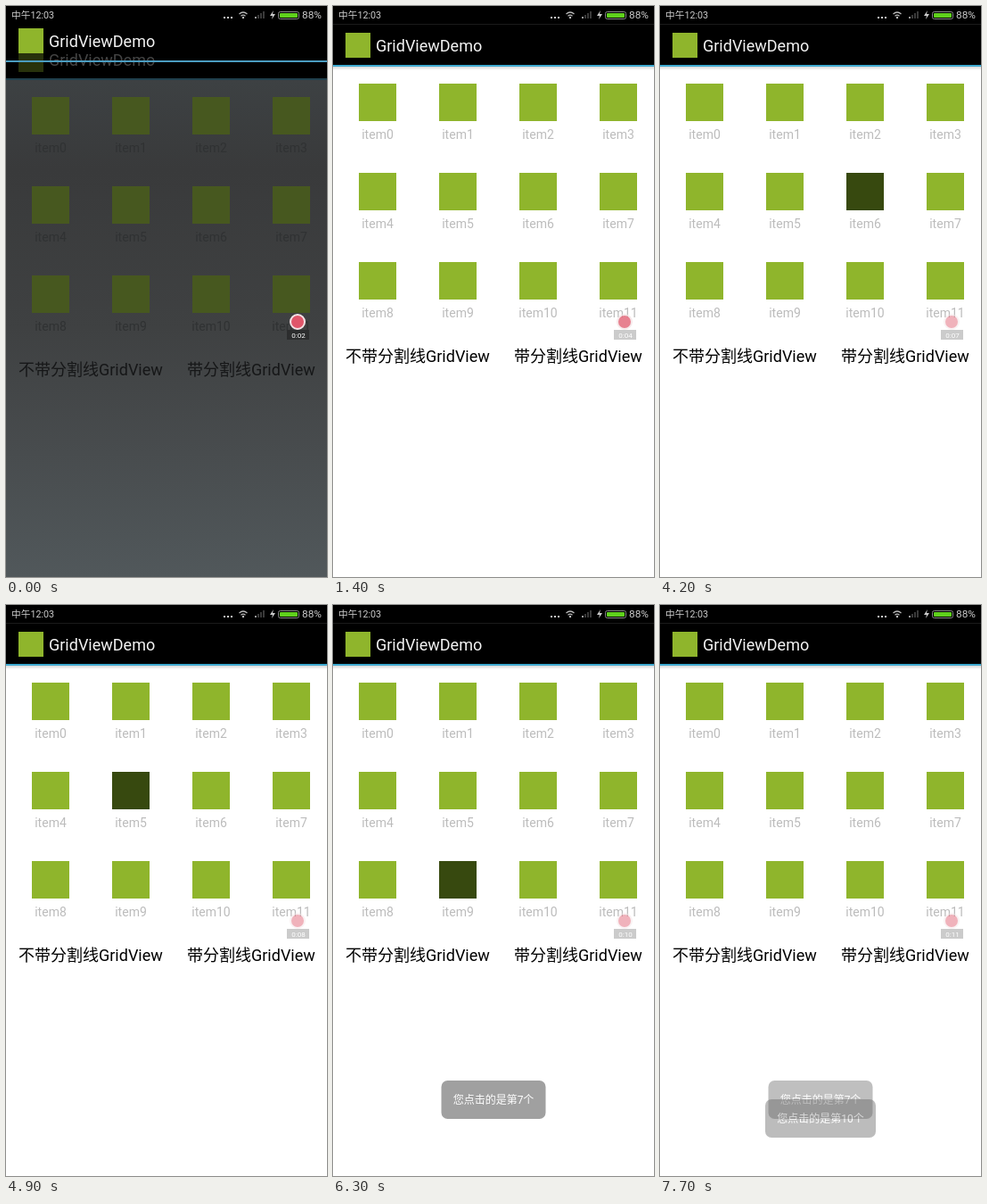
These frames come from a looping animation (360x640 px, 8 s). An HTML page:

```html
<!DOCTYPE html>
<html lang="zh">
<head>
<meta charset="utf-8">
<title>GridViewDemo</title>
<style>
html, body { margin: 0; width: 100%; height: 100%; overflow: hidden; background: #fff; }
svg { display: block; width: 360px; height: 640px; font-family: Roboto, "Noto Sans CJK SC", "Noto Sans CJK", sans-serif; }
</style>
</head>
<body>
<svg id="stage" viewBox="0 0 360 640"></svg>
<script>
const LOOP = 8000, STEP = 700;
const GREEN = '#8fb52c', PRESSED = '#37490f';
const SECONDS = [2, 3, 4, 4, 5, 6, 7, 8, 9, 10, 11, 11];
const PRESSED_AT = { 6: 6, 7: 5, 9: 9 };
const stage = document.getElementById('stage');

const rect = (x, y, w, h, fill, extra = '') =>
  `<rect x="${x}" y="${y}" width="${w}" height="${h}" fill="${fill}" ${extra}/>`;
const text = (x, y, size, fill, value, extra = '') =>
  `<text x="${x}" y="${y}" font-size="${size}" fill="${fill}" ${extra}>${value}</text>`;
const gradient = (id, stops) =>
  `<linearGradient id="${id}" x2="0" y2="1">` +
  stops.map(([at, color, alpha = 1]) =>
    `<stop offset="${at}" stop-color="${color}" stop-opacity="${alpha}"/>`).join('') +
  '</linearGradient>';
const MIDDLE = 'text-anchor="middle"';
const DEFS = '<defs>' +
  gradient('dim', [[0, '#3d4143'], [.18, '#393a3b'], [.5, '#3f4142'], [.75, '#484c4e'], [1, '#51585b']]) +
  gradient('shadow', [[0, '#000', .16], [1, '#000', 0]]) + '</defs>';

function titleBar(y, opacity = 1) {
  return `<g transform="translate(0 ${y})" opacity="${opacity}">` +
    rect(14, 30, 28, 28, GREEN) + text(48, 51, 18, '#f3f3f3', 'GridViewDemo') + '</g>';
}

function grid(dy, icon, label, button, pressed) {
  let out = `<g transform="translate(0 ${dy})">`;
  for (let i = 0; i < 12; i++) {
    const x = 50 + i % 4 * 90, y = 108 + Math.floor(i / 4) * 100;
    out += rect(x - 21, y - 21, 42, 42, i === pressed ? PRESSED : icon) +
      text(x, y + 40.5, 14, label, 'item' + i, MIDDLE);
  }
  return out + text(14, 399, 18, button, '不带分割线GridView') +
    text(203, 399, 18, button, '带分割线GridView') + '</g>';
}

function statusBar() {
  const dots = [245, 249, 253].map(x => rect(x - 1, 12, 2, 2, '#ccc')).join('');
  const bars = [0, 1, 2, 3].map(i =>
    rect(279 + i * 3, 12 - i * 2, 2, 2 + i * 2, i ? '#3a3a3a' : '#999')).join('');
  return text(6, 14, 10.7, '#ccc', '中午12:03') + dots +
    `<path d="M261.500 9Q266 5 270.500 9M263.500 11.200Q266 9 268.500 11.200"
      fill="none" stroke="#bbb" stroke-width="1.2"/>
    <circle cx="266" cy="13" r="1.200" fill="#bbb"/>` + bars +
    '<path d="M300 5l-4 6h3l-1 4 4-6h-3z" fill="#ccc"/>' +
    rect(305.5, 6.5, 23, 8, '#000', 'rx="2" stroke="#888"') +
    rect(307, 8, 20, 5, '#5fd01c', 'rx="1"') +
    text(332, 14, 11.8, '#ccc', '88%');
}

function recorder(seconds, opacity, box) {
  const time = '0:' + String(seconds).padStart(2, '0');
  return `<g opacity="${opacity}"><circle cx="327" cy="354" r="8" fill="#e0566a" stroke="#f3e3e5" stroke-width="2"/></g>` +
    rect(315, 363, 25, 11, box) + text(328, 372, 8, '#fff', time, MIDDLE);
}

function toast(top, width, message, opacity) {
  return `<g opacity="${opacity}">` + rect(180 - width / 2, top, width, 43, '#626262', 'rx="7"') +
    text(180, top + 26, 12, '#fff', message, MIDDLE) + '</g>';
}

function transition() {
  return rect(0, 0, 360, 83, '#000') + rect(0, 83, 360, 557, 'url(#dim)') +
    rect(0, 81, 360, 2, '#20404d') + titleBar(16, .28) +
    titleBar(-5) + rect(0, 61, 360, 2, '#4a9cc0') +
    grid(15, '#47581f', '#303233', '#161718', -1);
}

function screen(step) {
  return rect(0, 0, 360, 640, '#fff') + rect(0, 0, 360, 66, '#000') +
    rect(0, 20, 360, 1, '#1b1b1b') + rect(0, 66, 360, 2, '#3fa9d0') +
    rect(0, 68, 360, 4, 'url(#shadow)') +
    titleBar(0) + grid(0, GREEN, '#bcbcbc', '#000', PRESSED_AT[step]);
}

function toasts(step) {
  if (step < 9) return '';
  const opacity = { 9: .6, 10: 1, 11: .4 }[step];
  return toast(533, 117, '您点击的是第7个', opacity) +
    (step === 11 ? toast(554, 124, '您点击的是第10个', .42) : '');
}

function draw(step) {
  const base = step
    ? screen(step) + recorder(SECONDS[step], Math.max(.45, .9 - step * .08), '#cbcbcb')
    : transition() + recorder(SECONDS[0], 1, '#2c2d2e');
  stage.innerHTML = DEFS + base + statusBar() + toasts(step);
}

let shown = -1;
const start = performance.now();
function tick(now) {
  const step = Math.floor(Math.max(0, now - start) % LOOP / STEP);
  if (step !== shown) draw(shown = step);
  requestAnimationFrame(tick);
}
tick(start);
</script>
</body>
</html>
```
